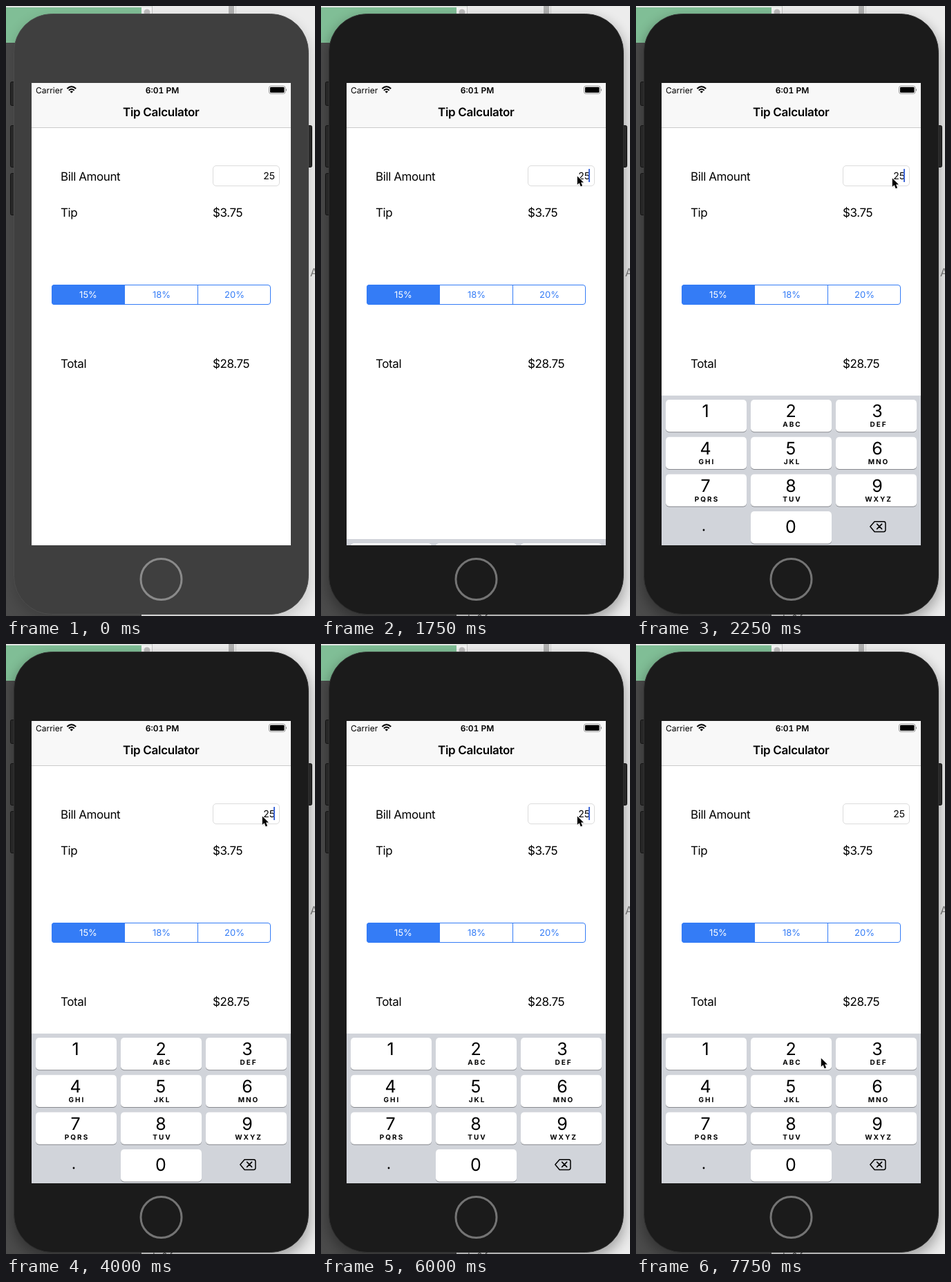
An HTML page that plays this animation: 447x880 px, repeating every 8 s.

```html
<!DOCTYPE html>
<html lang="en">
<head>
<meta charset="utf-8">
<title>Tip Calculator</title>
<style>
html, body { margin: 0; width: 100%; height: 100%; overflow: hidden; background: #e6e6e6; }
svg { display: block; width: 447px; height: 880px; font-family: Inter, Roboto, sans-serif; text-rendering: geometricPrecision; }
.label { font-size: 17px; letter-spacing: -.41px; }
.title { font-size: 17px; font-weight: 600; letter-spacing: -.3px; }
.small { font-size: 12px; }
.time { font-weight: 600; font-feature-settings: "tnum"; }
.seg { font-size: 13px; fill: #347cf6; text-anchor: middle; }
.digit { font-size: 25px; text-anchor: middle; }
.letters { font-size: 10px; font-weight: 700; letter-spacing: 2px; text-anchor: middle; }
</style>
</head>
<body>
<svg viewBox="0 0 447 880" xmlns="http://www.w3.org/2000/svg">
  <defs>
    <clipPath id="screen"><rect x="37" y="111" width="375" height="667"/></clipPath>
    <filter id="blur" x="-20%" y="-20%" width="140%" height="140%"><feGaussianBlur stdDeviation="9"/></filter>
    <filter id="soft" x="-50%" y="-50%" width="200%" height="200%"><feGaussianBlur stdDeviation="1"/></filter>
  </defs>

  <!-- desktop behind the phone -->
  <rect width="447" height="880" fill="#ececec"/>
  <rect y="53" width="196" height="827" fill="#4b4b4b"/>
  <rect width="196" height="53" fill="#80be96"/>
  <rect width="212" height="2" fill="#e2e6e3"/>
  <rect x="196" y="2" width="15" height="60" fill="#f4f4f4"/>
  <rect x="211" width="1" height="60" fill="#c4c4c4"/>
  <circle cx="204" cy="9" r="4.5" fill="#bdbdbd"/>
  <rect x="322" width="8" height="30" fill="#b0b0b0"/>
  <rect x="332" width="1" height="30" fill="#cfcfcf"/>
  <text x="440" y="390" font-size="16" fill="#7b7b7b">A</text>
  <text id="under" x="208" y="887" font-size="12" fill="#333">de 3 frame</text>
  <rect id="shadow" x="9" y="17" width="431" height="870" rx="56" filter="url(#blur)"/>

  <!-- phone -->
  <g fill="#282828" stroke="#131313">
    <rect x="6.5" y="109.5" width="8" height="34" rx="2"/>
    <rect x="6.5" y="172.5" width="8" height="60" rx="2"/>
    <rect x="6.5" y="241.5" width="8" height="60" rx="2"/>
    <rect x="434.5" y="172.5" width="8" height="60" rx="2"/>
  </g>
  <rect id="body" x="11.5" y="11.5" width="426" height="866" rx="55"/>
  <circle id="home" cx="224.5" cy="827" r="29.5" fill="none" stroke-width="3"/>

  <g clip-path="url(#screen)">
    <rect x="37" y="111" width="375" height="667" fill="#fff"/>
    <rect x="37" y="111" width="375" height="64" fill="#f8f8f8"/>
    <rect x="37" y="175" width="375" height="1" fill="#cbcbcb"/>

    <text class="small" x="43" y="125.5">Carrier</text>
    <g fill="none" stroke="#000" stroke-width="2">
      <path d="M88.4 119.2Q94.8 113.4 101.2 119.2M90.9 121.8Q94.8 118.3 98.7 121.8"/>
      <path d="M92.6 123.4Q94.8 121.6 97 123.4L94.8 125.8Z" fill="#000" stroke="none"/>
    </g>
    <text class="small time" x="226" y="125.5" text-anchor="middle">6:01 PM</text>
    <rect x="380.5" y="115.5" width="23.5" height="11" rx="2.6" fill="none" stroke="#999"/>
    <rect x="382" y="117" width="20.5" height="8" rx="1.2"/>
    <path d="M405 119.3q2.2 1.7 0 3.6z" fill="#888"/>
    <text class="title" x="169" y="159">Tip Calculator</text>

    <text class="label" x="79" y="251.5">Bill Amount</text>
    <text class="label" x="79" y="303.5">Tip</text>
    <text class="label" x="79" y="521.5">Total</text>
    <text class="label" x="299" y="303.5">$3.75</text>
    <text class="label" x="299" y="521.5">$28.75</text>
    <rect x="299.5" y="230.5" width="96" height="29" rx="4.5" fill="#fff" stroke="#dcdcdc"/>
    <text x="389" y="249.5" font-size="14" text-anchor="end">25</text>
    <rect id="caret" x="387" y="235" width="2" height="19" fill="#4068d8"/>

    <rect x="66.5" y="402.5" width="316" height="28" rx="3.5" fill="#fff" stroke="#347cf6"/>
    <path d="M172 402H70a4 4 0 0 0-4 4v21a4 4 0 0 0 4 4h102z" fill="#347cf6"/>
    <path d="M277.5 402v29" stroke="#347cf6"/>
    <text class="seg" x="119" y="421" style="fill:#fff">15%</text>
    <text class="seg" x="225" y="421">18%</text>
    <text class="seg" x="330.5" y="421">20%</text>

    <g id="pad">
      <rect x="37" y="562" width="375" height="216" fill="#d1d4da"/>
      <circle cx="98" cy="756" r="1.4"/>
      <path d="M338.8 751l6.3-7.2h13.2q2.6 0 2.6 2.6v9.4q0 2.6-2.6 2.6h-13.2z M348.6 747.4l7 7m0-7l-7 7" fill="none" stroke="#000" stroke-width="1.5" stroke-linejoin="round" stroke-linecap="round"/>
    </g>
  </g>

  <g id="cursor">
    <g transform="translate(.8 1.4) scale(.82)">
      <path d="M0 1v15l3.6-3.2 2.4 6 3-1.2-2.5-5.8h5z" opacity=".35" filter="url(#soft)"/>
      <path d="M0 0v15.2l3.5-3.1 2.5 5.9 2.9-1.2-2.5-5.7h4.7z" stroke="#fff" stroke-width="2" paint-order="stroke"/>
    </g>
  </g>
</svg>
<script>
const LOOP = 8000;
const $ = id => document.getElementById(id);

function add(parent, tag, attrs, text) {
  const el = document.createElementNS("http://www.w3.org/2000/svg", tag);
  for (const k in attrs) el.setAttribute(k, attrs[k]);
  if (text) el.textContent = text;
  parent.append(el);
}

// number pad
const letters = ["", "ABC", "DEF", "GHI", "JKL", "MNO", "PQRS", "TUV", "WXYZ"];
const mid = [100.5, 224, 349];

function key(col, row, digit, sub) {
  const x = 43 + col * 123, y = 568 + row * 53.7, base = 593 + row * 54;
  const box = { x, width: 117, height: 46.3, rx: 5 };
  add($("pad"), "rect", { ...box, y: y + 1, fill: "#898b90" });
  add($("pad"), "rect", { ...box, y, fill: "#fff" });
  add($("pad"), "text", { class: "digit", x: mid[col], y: digit ? base : base + 5 }, String(digit));
  if (sub) add($("pad"), "text", { class: "letters", x: mid[col] + 2, y: base + 14 }, sub);
}
letters.forEach((sub, i) => key(i % 3, Math.floor(i / 3), i + 1, sub));
key(1, 3, 0, "");

// each step: start time, then values held until the next step
const cursorSteps = [
  [0, null], [500, 341, 109], [750, 331, 128], [1000, 344, 192], [1250, 360, 237],
  [1500, 370, 244], [2000, 370, 247], [7250, 315, 372], [7500, 283, 561], [7750, 267, 596]
];
const padSteps = [[0, 220], [1750, 207], [2000, 20], [2250, 0]];
const caretSteps = [
  [0, 0], [1750, 1], [2500, .15], [2750, 0], [3000, 1], [3500, 0], [4000, 1], [4500, 0],
  [5000, 1], [5500, .15], [5750, 0], [6000, 1], [6500, 0], [7000, 1], [7500, 0]
];
const at = (steps, t) => steps.findLast(s => s[0] <= t);

function draw(t) {
  const [, x, y] = at(cursorSteps, t);
  $("cursor").setAttribute("visibility", x === null ? "hidden" : "visible");
  if (x !== null) $("cursor").setAttribute("transform", `translate(${x} ${y})`);
  $("pad").setAttribute("transform", `translate(0 ${at(padSteps, t)[1]})`);
  $("caret").setAttribute("opacity", at(caretSteps, t)[1]);

  const active = t >= 1750;
  $("body").setAttribute("fill", active ? "#1b1b1b" : "#3f3f3f");
  $("body").setAttribute("stroke", active ? "#303030" : "#4c4c4c");
  $("home").setAttribute("stroke", active ? "#747474" : "#8a8a8a");
  $("shadow").setAttribute("opacity", active ? .3 : .14);
  $("under").setAttribute("visibility", active ? "visible" : "hidden");
}

const start = performance.now();
function tick() {
  draw((performance.now() - start) % LOOP);
  requestAnimationFrame(tick);
}
tick();
</script>
</body>
</html>
```
